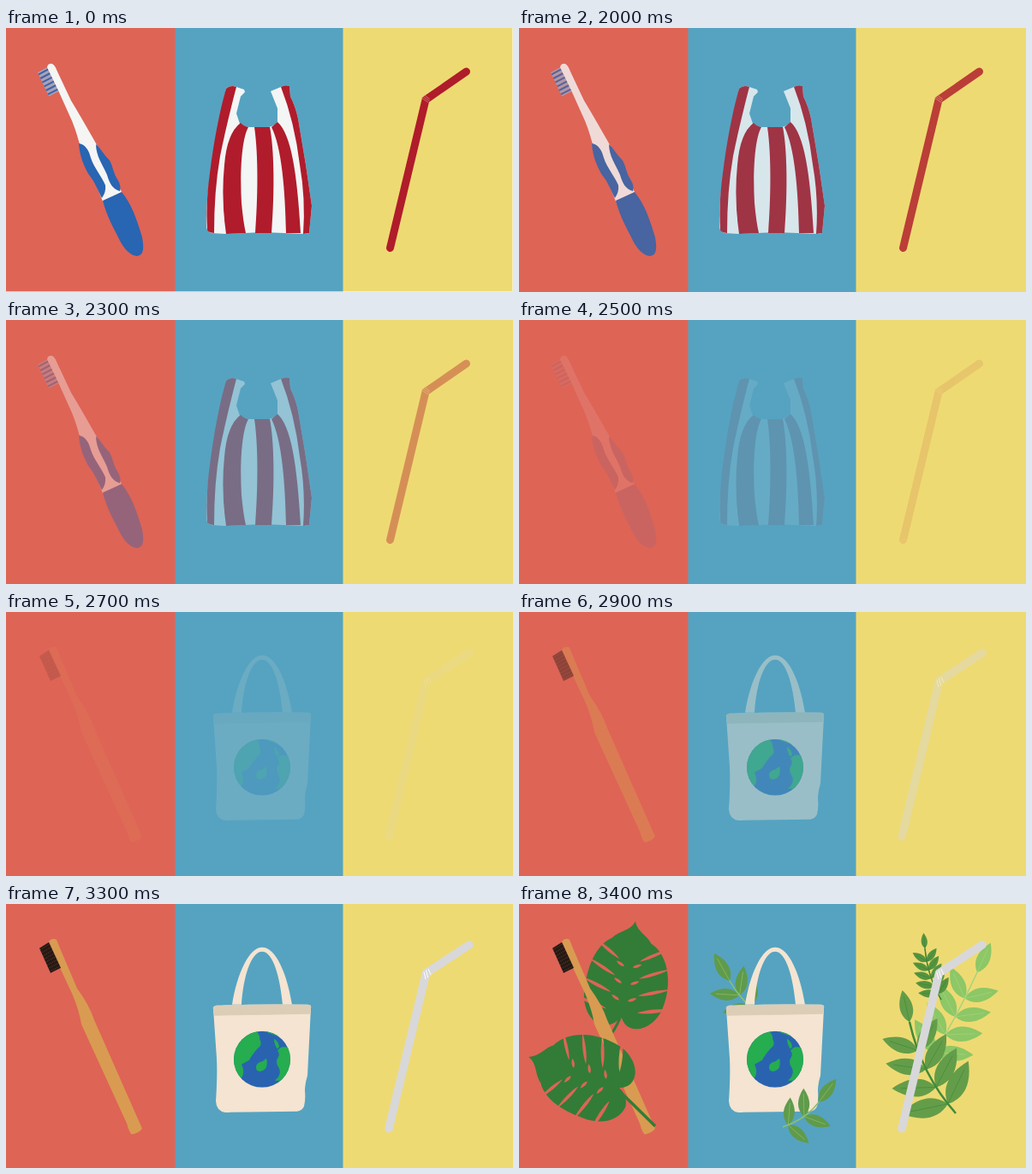
Recreate the animation shown at these times as an HTML page. Size 592 by 309 pixels, loop 8.4 s.

```html
<!DOCTYPE html>
<html lang="en">
<head>
<meta charset="utf-8">
<title>Plastic swaps</title>
<style>
html, body { margin: 0; width: 100%; height: 100%; overflow: hidden; }
svg { display: block; width: 100%; height: 100%; }
</style>
</head>
<body>
<svg viewBox="0 0 592 309" preserveAspectRatio="none">
  <defs>
    <clipPath id="globe"><circle cx="299" cy="181" r="33"/></clipPath>
    <mask id="slits" maskUnits="userSpaceOnUse" x="-60" y="-125" width="120" height="150">
      <rect x="-60" y="-125" width="120" height="150" fill="#fff"/>
    </mask>
    <!-- base of the blade at the origin, tip pointing up -->
    <g id="monstera" mask="url(#slits)">
      <path fill="#327c37" d="M0 -114C4 -102 16 -100 22 -91C46 -80 53 -45 47 -20C43 0 26 14 12 10Q4 8 0 -2Q-5 10 -18 12C-36 11 -48 -8 -47 -30C-47 -62 -38 -82 -24 -91C-16 -101 -4 -102 0 -114Z"/>
    </g>
  </defs>
  <rect width="198" height="309" fill="#de6456"/>
  <rect x="393" width="199" height="309" fill="#eeda73"/>
  <rect x="197.5" width="196" height="309" fill="#55a3c1"/>
  <path id="edge" d="M0 308.5H591.5V0" fill="none" stroke="#fff" stroke-opacity=".6"/>

  <!-- disposable items -->
  <g class="old">
    <path fill="#aaa1b6" d="M37 52L48 46L62 74L50 80Z"/>
    <g id="bristles" stroke="#3d63a8" stroke-width="2"></g>
    <path fill="#f5f5f4" d="M48 46Q49 41 54 42Q57 43 60 51L76 85Q84 98 105 135L121 163L135 192L113 203L86 136Q80 114 74 102L61 73Z"/>
    <g fill="#2865b2">
      <path d="M85 135C93 136 97 144 99 152C103 164 112 174 116 184Q117 192 112 199C108 192 104 180 97 172C91 162 86 150 85 135Z"/>
      <path d="M105 136C110 140 113 147 121 155C125 162 125 169 130 177C134 183 134 188 133 191C124 188 121 182 118 172C113 160 105 150 105 136Z"/>
      <path d="M113 202L135 192C147 206 153 225 159 245C162 262 159 266 153 267C145 266 139 260 133 249C127 236 118 222 113 202Z"/>
    </g>
  </g>
  <g class="old">
    <path fill="#f4f5f5" d="M257 71Q262 66 269 69L278 72L279 75L274 80L269 100L273 112Q276 115 284 116H307Q314 114 317 110V94Q313 84 309 74L321 69Q326 66 331 68L332 80Q338 92 341 106L350 160L357 208L354 240L349 241L300 239L257 241L240 240Q234 238 234 232Q233 200 240 165Q248 110 257 71Z"/>
    <g fill="#b01c2b">
      <path d="M257 71Q262 66 269 69C263 92 255 125 250 150Q243 190 243 240Q235 239 235 236Q233 205 238 170C243 130 250 95 257 71Z"/>
      <path d="M274 111Q277 115 283 116C275 130 273 170 275 205Q277 227 280 240L257 241Q251 200 255 160Q258 123 274 111Z"/>
      <path d="M290 116H308C313 140 314 190 310 240H291C294 200 295 150 290 116Z"/>
      <path d="M310 116L317 110C333 124 340 170 344 240H327C326 190 322 140 310 116Z"/>
      <path d="M321 69Q326 66 331 68L332 80Q338 92 341 106L350 160L357 208L354 240L347 241Q350 200 343 160Q337 110 321 69Z"/>
    </g>
  </g>
  <g class="old" fill="none" stroke-linecap="round" stroke-linejoin="round">
    <path stroke="#b01c2a" stroke-width="9" d="M448.500 257.500L490 84L537.500 51"/>
    <path stroke="#d9827a" stroke-width=".8" d="M485.500 82L493 87M487 80.500L494 85M489 79L494.500 83"/>
  </g>

  <!-- lasting items -->
  <g class="leaves">
    <use href="#monstera" transform="translate(119 133) rotate(8.500)"/>
    <path fill="none" stroke="#327c37" stroke-width="3" d="M120 128Q116 140 108 152"/>
  </g>
  <g class="new" transform="translate(0 .8)">
    <path fill="#d99b51" d="M50 43Q54 38 59 41L63 51L83 98Q97 117 103 135L159 262Q156 267 147 269Q144 267 141 256L88 140Q86 126 78 106L64 76Z"/>
    <path fill="#261914" d="M39 51L50 44L64 74L52 80Z"/>
    <g id="tufts" stroke="#79513b" stroke-width=".8" stroke-dasharray="1 1.300"></g>
  </g>
  <g class="leaves">
    <use href="#monstera" transform="translate(119 216) rotate(-71)"/>
    <path fill="none" stroke="#327c37" stroke-width="3.500" d="M112 214Q135 236 159 260"/>
  </g>

  <g class="leaves" id="sprigBack"></g>
  <g class="new" transform="translate(0 .8)">
    <path fill="#f4e4d1" d="M264 117C270 80 284 50 299 50C315 50 328 80 334 117H323C320 85 312 55 299 55C286 55 277 85 275 117Z"/>
    <path fill="#f4e4d1" d="M242 122Q241 119 246 118Q300 116 352 117Q357 117 356 121L352 200Q349 210 349 218Q350 228 348 236Q346 241 340 242L262 243Q246 245 245 230Q247 200 246 180Z"/>
    <path fill="#dccdb7" d="M242 122Q241 119 246 118Q300 116 352 117Q357 117 356 121L355.500 128Q300 129 243 130Z"/>
    <g clip-path="url(#globe)">
      <rect x="266" y="148" width="66" height="66" fill="#2963b0"/>
      <g fill="#25ad4f">
        <path d="M290 146Q297 152 296 157Q300 164 294 168Q287 176 284 182L275 187Q280 197 274 204L262 204V146Z"/>
        <path d="M304 180Q306 187 303 192Q298 197 293 194Q290 189 295 185Q300 184 304 180Z"/>
        <path d="M317 171Q322 164 330 168L336 180Q332 203 322 206L314 206Q323 198 318 190Q314 184 318 178Q320 174 317 171Z"/>
        <path d="M313 157Q318 160 319 166L317 169Q313 164 313 157Z"/>
        <path d="M299 147Q312 146 320 155L309 151Z"/>
      </g>
    </g>
  </g>
  <g class="leaves" id="sprigFront"></g>

  <g class="leaves" id="fern"></g>
  <g class="new" transform="translate(0 .8)" fill="none" stroke-linecap="round" stroke-linejoin="round">
    <path stroke="#d8d8da" stroke-width="9.500" d="M447 262L490.500 80L541 47"/>
    <path stroke="#fff" stroke-width="1" d="M488 79L490 87M490.500 77L492.500 85M493 75.500L496 82"/>
  </g>
</svg>
<script>
const LOOP = 8400, FADE = 2000, STEP = 100, LEAVES = 3400;
const all = s => document.querySelectorAll(s);
const byId = id => document.getElementById(id);
const add = (id, markup) => byId(id).insertAdjacentHTML('beforeend', markup);
const mix = (p, q, k) => [p[0] + (q[0] - p[0]) * k, p[1] + (q[1] - p[1]) * k];

// Evenly spaced strokes between two sides of a quadrilateral
function rungs(id, n, a, b, c, d) {
  let path = '';
  for (let i = 0; i < n; i++) {
    const k = (i + 0.5) / n;
    path += `M${mix(a, b, k)}L${mix(c, d, k)}`;
  }
  add(id, `<path d="${path}"/>`);
}

// Almond from base to tip; w is its width relative to its length
function blade([x, y], [tx, ty], w) {
  const dx = tx - x, dy = ty - y;
  const at = (k, s) => [x + dx * k - dy * s * w, y + dy * k + dx * s * w];
  return `M${x},${y}C${at(.25, .67)} ${at(.6, .67)} ${tx},${ty}` +
    `C${at(.6, -.67)} ${at(.25, -.67)} ${x},${y}Z`;
}

// Curved slits from the rim and small holes beside the midrib
function cutMonstera() {
  let d = '';
  for (const side of [-1, 1]) {
    for (let i = 0; i < 4; i++) {
      const y = -8 - 20 * i;
      d += blade([side * (18 - 2 * i), y], [side * (58 - 5 * i), y - 10 - 3 * i], .1);
      if (i) d += blade([side * 5, y + 8], [side * 15, y + 3], .3);
    }
  }
  add('slits', `<path d="${d}"/>`);
}

// Paired leaves along a quadratic stem, shrinking towards one end leaf
function sprig(id, { fill, vein, stem: [a, b, c], pairs, from, to, spread, w = .4, line = 1.5 }) {
  let shapes = '', veins = `M${a}Q${b} ${c}`;
  const put = (p, angle, len) => {
    const tip = [p[0] + len * Math.cos(angle), p[1] + len * Math.sin(angle)];
    shapes += blade(p, tip, w);
    veins += `M${p}L${mix(p, tip, .8)}`;
  };
  for (let i = 0; i <= pairs; i++) {
    const t = i < pairs ? .12 + .8 * i / pairs : 1;
    const p = mix(a, b, t), q = mix(b, c, t);
    const along = Math.atan2(q[1] - p[1], q[0] - p[0]);
    const open = (spread + 20 * (1 - t)) * Math.PI / 180;
    const len = from + (to - from) * t;
    for (const s of i < pairs ? [-1, 1] : [0]) put(mix(p, q, t), along + s * open, len);
  }
  add(id, `<path d="${shapes}" fill="${fill}"/>` +
    `<path d="${veins}" fill="none" stroke="${vein}" stroke-width=".7"/>` +
    `<path d="M${a}Q${b} ${c}" fill="none" stroke="${vein}" stroke-width="${line}"/>`);
}

rungs('bristles', 6, [37, 52], [50, 80], [48, 46], [62, 74]);
rungs('tufts', 8, [39, 51], [52, 80], [50, 44], [64, 74]);
cutMonstera();

const small = { fill: '#5f9b4b', vein: '#8fc06c', pairs: 2 };
sprig('sprigBack', { ...small, stem: [[274, 124], [256, 108], [246, 90]], from: 32, to: 37, spread: 38 });
sprig('sprigFront', { ...small, stem: [[308, 261], [335, 252], [350, 232]], from: 32, to: 34, spread: 46 });
sprig('fern', {
  fill: '#8dc766', vein: '#a5d47c', stem: [[478, 186], [510, 135], [535, 80]],
  pairs: 4, from: 46, to: 38, spread: 45
});
sprig('fern', {
  fill: '#56943f', vein: '#3f8639', stem: [[493, 112], [477, 85], [474, 52]],
  pairs: 5, from: 24, to: 18, spread: 42
});
sprig('fern', {
  fill: '#649d49', vein: '#408a38', stem: [[510, 245], [470, 200], [456, 138]],
  pairs: 4, from: 58, to: 38, spread: 46, line: 2.5
});

function draw(t) {
  const k = Math.floor((t - FADE) / STEP);
  const fade = v => Math.max(0, Math.min(1, v / 7));
  all('.old').forEach(g => g.style.opacity = t < FADE ? 1 : fade(5.75 - k));
  all('.new').forEach(g => g.style.opacity = fade(k - 6));
  all('.leaves').forEach(g => g.style.display = t >= LEAVES ? '' : 'none');
  byId('edge').style.display = t < FADE ? '' : 'none';
}

const start = performance.now();
function tick() {
  draw((performance.now() - start) % LOOP);
  requestAnimationFrame(tick);
}
tick();
</script>
</body>
</html>
```
